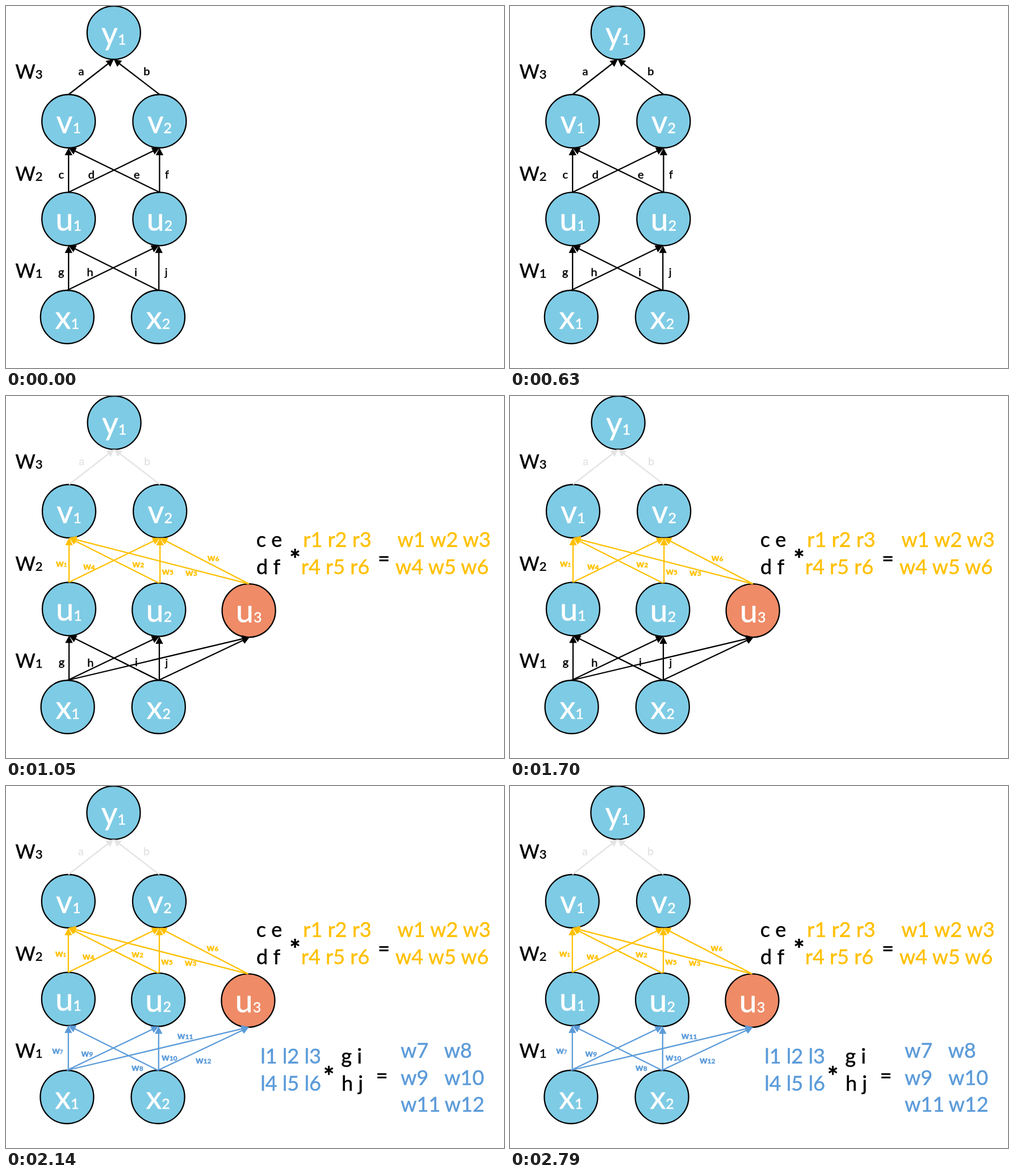
Write an HTML page that moves like this. It is 877 px wide and 638 px high and loops after 3230 ms.

```html
<!DOCTYPE html>
<html lang="en">
<head>
<meta charset="utf-8">
<title>Network layers</title>
<style>
html, body { margin: 0; width: 100%; height: 100%; overflow: hidden; background: #fff; }
svg { display: block; width: 877px; height: 638px; font-family: Lato, sans-serif; }
text { white-space: pre; stroke-width: 0.5; }
</style>
</head>
<body>
<svg id="stage" viewBox="0 0 877 638"></svg>
<script>
const NS = 'http://www.w3.org/2000/svg';
const BLACK = '#000', GOLD = '#ffc000', BLUE = '#5b9bd9', GRAY = '#e4e4e4';
const SKY = '#7ecbe5', CORAL = '#ef8b67';
const R = 47, LINE = 2.3, ROW = 47.5;
const stage = document.getElementById('stage');

function add(parent, tag, attrs, content) {
  const el = document.createElementNS(NS, tag);
  for (const k in attrs) el.setAttribute(k, attrs[k]);
  if (content !== undefined) el.textContent = content;
  return parent.appendChild(el);
}

function label(g, x, y, str, size, fill, anchor = 'middle', weight = 400) {
  return add(g, 'text', {
    x, y, fill, stroke: fill, 'font-size': size, 'font-weight': weight, 'text-anchor': anchor
  }, str);
}

function indexed(g, x, y, str, index, size, subSize, fill, weight) {
  const text = label(g, x, y, str, size, fill, 'middle', weight);
  add(text, 'tspan', { 'font-size': subSize }, index);
}

// A row of nodes; ports are the x positions where incoming arrows land.
function layer(name, count, x, y, gap = 160.2, drop = 0, portGap = gap) {
  return Array.from({ length: count }, (_, i) =>
    ({ name, index: i + 1, x: x + gap * i, y: y + drop * i, port: x + portGap * i }));
}

function drawNode(g, { name, index, x, y }) {
  const fill = index === 3 ? CORAL : SKY;
  add(g, 'circle', { cx: x, cy: y, r: R, fill, stroke: BLACK, 'stroke-width': LINE });
  indexed(g, x, y + 21, name, index, 56, 25, '#fff');
}

function arrow(g, color, x1, y1, x2, y2) {
  const len = Math.hypot(x2 - x1, y2 - y1);
  const angle = Math.atan2(y2 - y1, x2 - x1) * 180 / Math.PI;
  const a = add(g, 'g', { transform: `translate(${x1} ${y1}) rotate(${angle})` });
  add(a, 'path', { d: `M0 0H${len - 9}`, stroke: color, 'stroke-width': LINE });
  add(a, 'path', { d: `M${len} 0l-13 -6.7v13.4z`, fill: color });
}

// Joins every lower node to every upper one and calls mark(n, x, y) beside each arrow.
// along(n) is the label's place on the arrow, lift(n) its height above it.
function connect(g, color, lower, upper, { along, lift, side = 13 }, mark) {
  let n = 0;
  for (const to of upper) for (const from of lower) {
    const upright = Math.abs(to.port - from.x) < 5;
    const x1 = upright ? to.port : from.x, y1 = from.y - R;
    const x2 = to.port, y2 = to.y + R;
    arrow(g, color, x1, y1, x2, y2);
    const beside = upright ? (from.index === 1 ? -side : side) : 0;
    const t = along(n);
    mark(n, x1 + (x2 - x1) * t + beside, y1 + (y2 - y1) * t - lift(n));
    n++;
  }
}

const even = (t, lift) => ({ along: () => t, lift: () => lift });
const spread = (ts, lifts, side) => ({ along: n => ts[n], lift: n => lifts[n], side });
const PLAIN = even(0.25, 5), TOP = even(0.28, 17);
const GOLD_SPOTS = spread([.28, .23, .32, .22, .12, .4], [5, 9, -12, 5, 5, 8], 13.5);
const BLUE_SPOTS = spread([.3, .23, .22, .15, .65, .5], [5, -19, 7, 5, 6, -26], 19);

function network(g, step) {
  const wide = step > 0;
  const y = layer('y', 1, 189.8, 47);
  const v = layer('v', 2, 110.2, 203);
  const u = wide ? layer('u', 3, 110.2, 375.3, 158.3, 1.4, 159)
                 : layer('u', 2, 110.2, 375.3, 160.2, 0, 159);
  const x = layer('x', 2, 107.8, 548);
  [y, v, u, x].flat().forEach(node => drawNode(g, node));

  const letters = (names, color) => (n, px, py) => label(g, px, py, names[n], 20, color);
  const weights = (first, color) => (n, px, py) => {
    const subSize = n === 0 ? 9 : 12;
    indexed(g, px, py, 'w', first + n, 17, subSize, color, 700);
  };

  const fade = wide ? GRAY : BLACK;
  connect(g, fade, v, y, TOP, letters('ab', fade));

  if (wide) connect(g, GOLD, u, v, GOLD_SPOTS, weights(1, GOLD));
  else connect(g, BLACK, u, v, PLAIN, letters('cedf', BLACK));

  if (step === 2) connect(g, BLUE, x, u, BLUE_SPOTS, weights(7, BLUE));
  else connect(g, BLACK, x, u, PLAIN, letters('gihj', BLACK));
}

function matrix(g, color, x, y, rows, lean = 0, anchor) {
  rows.forEach((row, i) => label(g, x + lean * i, y + ROW * i, row, 36, color, anchor));
}

function operators(g, y, timesX, equalsX) {
  label(g, timesX, y + 38, '*', 46, BLACK, 'middle', 700);
  label(g, equalsX, y + 33, '=', 36, BLACK);
}

function equations(g, step) {
  if (step > 0) {
    matrix(g, BLACK, 463.5, 266, ['c e', 'd f'], -1.5);
    operators(g, 266, 509, 665.5);
    matrix(g, GOLD, 583.5, 266, ['r1 r2 r3', 'r4 r5 r6'], -3.5);
    matrix(g, GOLD, 771.5, 266, ['w1 w2 w3', 'w4 w5 w6'], -3.5);
  }
  if (step === 2) {
    matrix(g, BLUE, 501.5, 489, ['l1 l2 l3', 'l4 l5 l6']);
    operators(g, 490, 568.5, 662);
    matrix(g, BLACK, 608.5, 489, ['g i', 'h j'], 1.5);
    matrix(g, BLUE, 695, 479, ['w7', 'w9', 'w11'], 0, 'start');
    matrix(g, BLUE, 771.5, 479, ['w8', 'w10', 'w12'], 0.5, 'start');
  }
}

[479, 308, 128].forEach((y, i) => indexed(stage, 40.5, y, 'W', i + 1, 34, 22, BLACK));

// Each step holds until its end time; the network sits dx aside.
const STEPS = [{ end: 1050, dx: 0 }, { end: 2140, dx: 0.8 }, { end: 3230, dx: -0.4 }];
const LOOP = 3230;
const views = STEPS.map(({ dx }, step) => {
  const view = add(stage, 'g', { visibility: 'hidden' });
  network(add(view, 'g', { transform: `translate(${dx} 0)` }), step);
  equations(view, step);
  return view;
});

const start = performance.now();
function draw(now) {
  const t = Math.max(0, now - start) % LOOP;
  const current = STEPS.findIndex(s => t < s.end);
  views.forEach((v, i) => v.setAttribute('visibility', i === current ? 'visible' : 'hidden'));
  requestAnimationFrame(draw);
}
draw(start);
</script>
</body>
</html>
```
